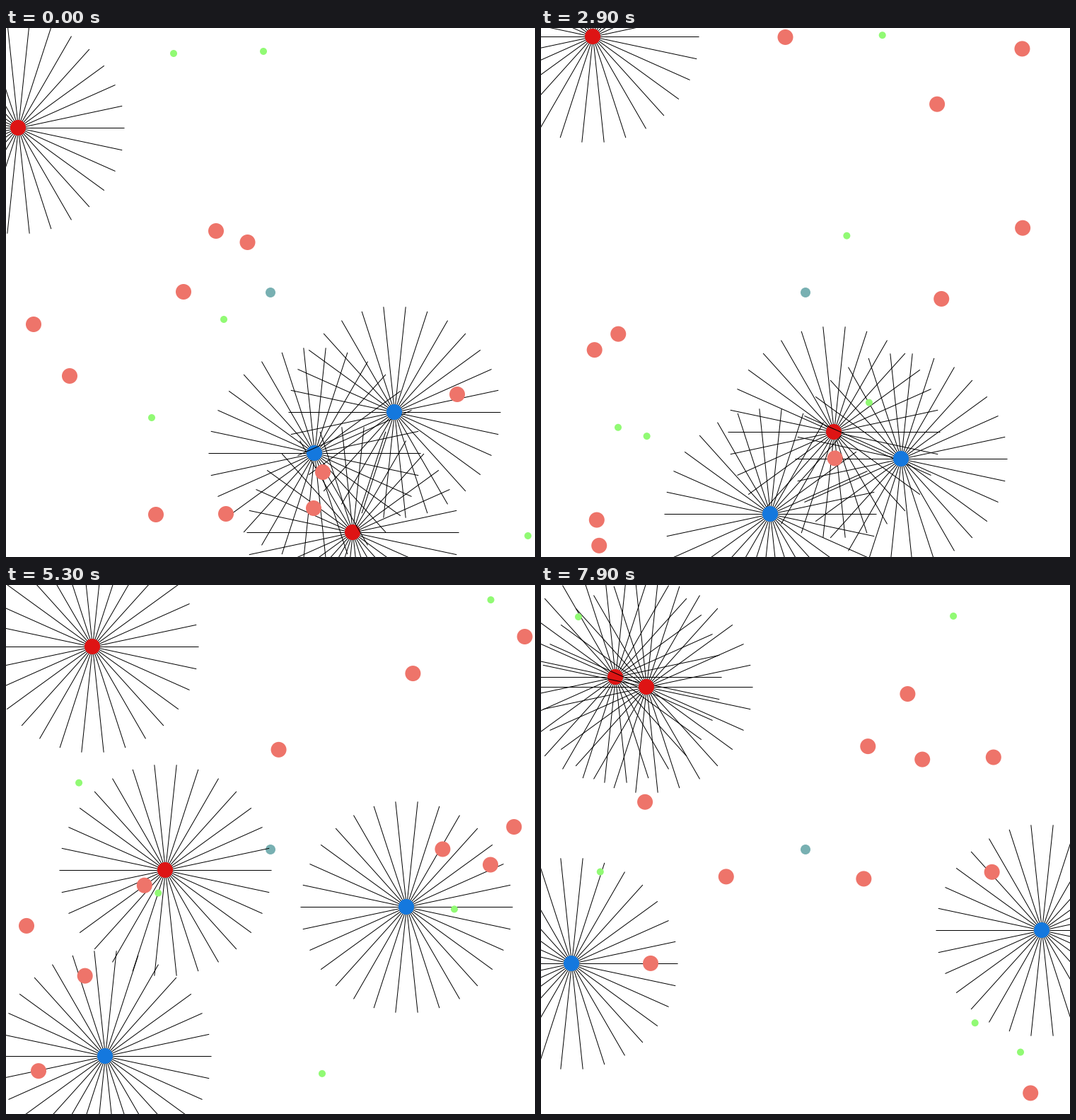
A matplotlib script that plays this animation: 748 by 748 pixels, repeating every 8 s.

```python
import numpy as np
import matplotlib.pyplot as plt
from matplotlib.animation import FuncAnimation
from matplotlib.collections import LineCollection

SIZE, DPI = 748, 88
FRAMES, INTERVAL = 80, 100
STEPS = 172

RED, BLUE = "#de1414", "#1478de"
PINK, GREEN, TEAL = "#ee746a", "#91fa74", "#78b0b2"
CENTER = np.array([374.0, 374.0])
CORE = 75.5  # unseen obstacle around the small teal disc

# Starting state of each ball: x, y, vx, vy
PREY = [
    (237, 36, 3.9, -0.41), (364, 33, 1.085, -5.065), (308, 412, -6.5, 2.425),
    (206, 551, -0.895, 5.72), (738, 718, -4.35, -2.99),
]
POISON = [
    (297, 287, 0.77, -4.35), (341.5, 303, 3.47, -3.1), (251, 373, -2.25, 0.947),
    (39, 419, 0.632, 4.39), (90, 492, -2.31, -0.585), (638, 518, -3.53, 5.59),
    (448, 628, -2, -0.5), (435, 679, 0.8, -0.5), (311, 687, 1.5, -0.6),
    (212, 688, -2.06, 0.86),
]
# A caught poison ball is reborn elsewhere: index -> step, new state
REBORN = {
    5: (104, 613, 399, 0.4, -2.32), 6: (5, 678, 99, 2.02, -1.84),
    7: (15, 612, 228, 1.44, 1.14), 8: (20, 536, 378, -4.34, -0.06),
    9: (131, 597, 632, 2.38, 2.16),
}

# Hunters steer smoothly through a few points, in drawing order
KEYS = np.array([0, 26, 46, 78, 98, 134, 171])
HUNTERS = [
    (RED, [(17, 141), (121, 47), (69, 19), (90, 28), (97, 94), (146, 64), (105, 130)]),
    (RED, [(490, 713), (488, 633), (494, 625), (326, 507), (248, 421), (215, 381), (149, 144)]),
    (BLUE, [(436, 601), (348, 657), (366, 655), (266, 708), (191, 677), (95, 649), (43, 535)]),
    (BLUE, [(549, 543), (443, 714), (494, 679), (505, 548), (483, 511), (680, 409), (708, 488)]),
]


def ball_path(state, radius, reborn=None):
    """Straight flight that bounces off the stage walls and the core."""
    pos, vel = np.split(np.array(state, float), 2)
    path = [pos]
    for n in range(1, STEPS):
        if reborn and n == reborn[0]:
            pos, vel = np.split(np.array(reborn[1:], float), 2)
        else:
            pos = pos + vel
        inside = np.clip(pos, radius, SIZE - radius)
        vel = np.where(inside == pos, vel, -vel)
        pos = inside
        gap = pos - CENTER
        dist = np.hypot(*gap)
        if dist < CORE + radius and vel @ gap < 0:
            normal = gap / dist
            vel = vel - 2 * (vel @ normal) * normal
        path.append(pos)
    return np.array(path)


def hunter_path(points):
    """Cubic Hermite curve through the points."""
    p = np.array(points, float)
    slope = np.gradient(p, KEYS, axis=0)
    n = np.arange(STEPS)
    i = np.clip(np.searchsorted(KEYS, n, side="right") - 1, 0, len(KEYS) - 2)
    h = (KEYS[i + 1] - KEYS[i])[:, None]
    u = (n - KEYS[i])[:, None] / h
    return ((1 + 2 * u) * (1 - u) ** 2 * p[i] + u * (1 - u) ** 2 * h * slope[i]
            + u * u * (3 - 2 * u) * p[i + 1] + u * u * (u - 1) * h * slope[i + 1])


fig = plt.figure(figsize=(SIZE / DPI, SIZE / DPI), dpi=DPI, facecolor="white")
ax = fig.add_axes([0, 0, 1, 1])
ax.set(xlim=(0, SIZE), ylim=(SIZE, 0))
ax.axis("off")


def disc(radius, color, z, center=(0, 0)):
    return ax.add_patch(plt.Circle(center, radius, fc=color, lw=0, zorder=z))


disc(7, TEAL, 1, CENTER)

angles = np.radians(np.arange(0, 360, 12))
rays = 150 * np.column_stack([np.cos(angles), np.sin(angles)])

movers, stars = [], []
for k, (color, points) in enumerate(HUNTERS):
    path = np.round(hunter_path(points))
    lines = LineCollection([], colors="black", linewidths=72 / DPI,
                           zorder=2 + 2 * k)
    lines.set_snap(False)
    ax.add_collection(lines, autolim=False)
    stars.append((lines, path + 0.5))  # rays run along pixel centres
    movers.append((disc(11, color, 3 + 2 * k), path))
for state in PREY:
    movers.append((disc(5, GREEN, 20), ball_path(state, 5)))
for k, state in enumerate(POISON):
    movers.append((disc(11, PINK, 21), ball_path(state, 11, REBORN.get(k))))


def update(frame):
    n = int(13 * frame / 6 + 0.55)
    for lines, path in stars:
        lines.set_segments([(path[n], path[n] + ray) for ray in rays])
    for circle, path in movers:
        circle.center = tuple(path[n])
    return [s[0] for s in stars] + [m[0] for m in movers]


anim = FuncAnimation(fig, update, frames=FRAMES, interval=INTERVAL,
                     repeat=True, repeat_delay=0, blit=False)
plt.show()
```
